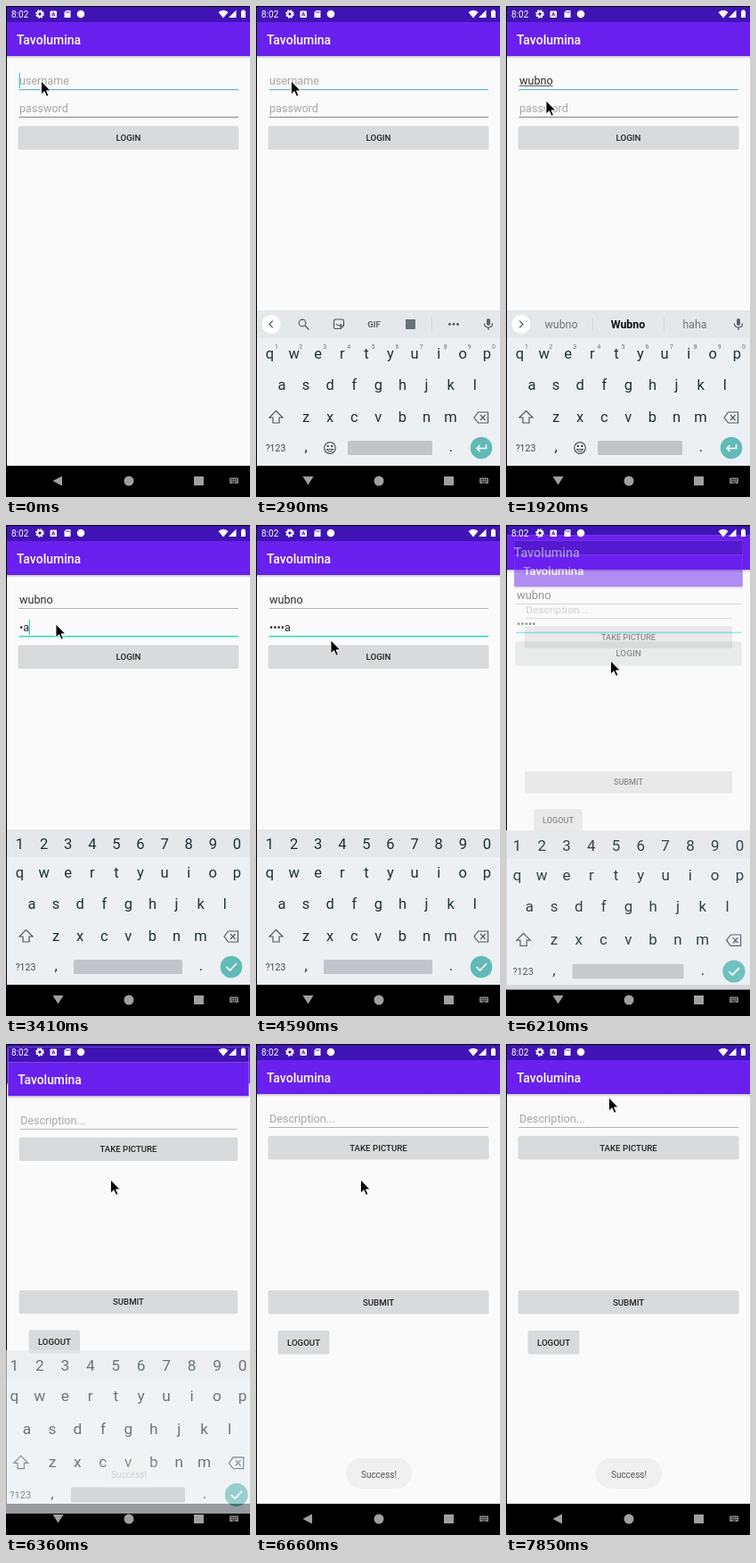
These frames come from a looping animation (274 px wide and 550 px high, 7.99 s). An HTML page:

```html
<!DOCTYPE html>
<html lang="en">
<head>
<meta charset="utf-8">
<title>Login demo</title>
<style>
  html, body { margin: 0; width: 100%; height: 100%; overflow: hidden; background: #000; }
  svg { display: block; width: 274px; height: 550px; font-family: Roboto, "Noto Sans", sans-serif; }
  text { white-space: pre; }
  .title { font-size: 14px; font-weight: 500; fill: #fff; }
  .field { font-size: 12.6px; fill: #2b2b2b; }
  .hint { font-size: 12.6px; fill: #a6a6a6; }
  .btn { font-size: 9.7px; font-weight: 500; fill: #222; text-anchor: middle; }
  .key { font-size: 16.5px; fill: #1c3038; text-anchor: middle; }
  .small { font-size: 10.5px; fill: #3b4a51; text-anchor: middle; }
  .sup { font-size: 7px; fill: #66737a; text-anchor: middle; }
  .word { font-size: 12.4px; fill: #707478; text-anchor: middle; }
  .line { fill: none; stroke: #4b585e; stroke-width: 1.2; }
</style>
</head>
<body>
<svg viewBox="0 0 274 550">
  <defs>
    <clipPath id="screen"><rect x="1" y="1" width="273" height="514"/></clipPath>
    <clipPath id="loginBox"><rect x="14" y="134.500" width="247" height="25.500" rx="1.500"/></clipPath>
    <linearGradient id="fall" x2="0" y2="1">
      <stop stop-color="#000" stop-opacity=".22"/><stop offset="1" stop-color="#000" stop-opacity="0"/>
    </linearGradient>
  </defs>
  <rect width="274" height="550"/>

  <g id="nav" fill="#a0a0a0">
    <path id="back" d="M52.500 532L63 526.500V537.500Z"/>
    <path id="down" d="M52.500 527H64.500L58.500 536.500Z"/>
    <circle cx="138" cy="532" r="5.500"/>
    <rect x="211" y="527" width="11" height="10"/>
    <rect x="251" y="528.500" width="10" height="6.500" rx="1" fill="#858585"/>
    <path d="M252.500 530.500H260M252.500 532.300H260" stroke="#000" stroke-dasharray="1 .8"/>
    <path d="M254 534H258" stroke="#000" stroke-width=".8"/>
  </g>

  <g clip-path="url(#screen)">
    <g id="login"></g>
    <g id="post"></g>
  </g>
  <g id="status" fill="#fff">
    <text x="6" y="13" font-size="10">8:02</text>
    <circle cx="38" cy="9" r="2.700" fill="none" stroke="#fff" stroke-width="2"/>
    <circle cx="38" cy="9" r="4" fill="none" stroke="#fff" stroke-width="1.600" stroke-dasharray="1.800 1.340"/>
    <rect x="49.500" y="5.500" width="7.500" height="7.500" rx="1"/>
    <path d="M51.500 11.500L53.250 7L55 11.500M52.200 10H54.300" stroke="#4013b4" stroke-width=".9" fill="none"/>
    <path d="M67.500 5H72.500V13H65.500V7Z"/>
    <path d="M67.700 6V8M69.300 6V8M70.900 6V8" stroke="#4013b4" stroke-width=".7"/>
    <circle cx="84" cy="9" r="4.300"/>
    <path d="M238.500 7Q244 2.500 249.500 7L244 13.500Z"/>
    <path d="M258.500 4.500V13H250Z"/>
    <path d="M265.200 4.500H267.800V5.500H269V13H264V5.500H265.200Z"/>
  </g>

  <g id="kbClip">
    <g id="kb">
      <rect x="1" y="341" width="273" height="174" fill="#ecf0f3"/>
      <rect x="1" y="341" width="273" height="31" fill="#e5e8eb"/>
      <g id="keys"></g>
      <path class="line" d="M22.500 453.500L30 461H26V467H19V461H15Z"/>
      <path class="line" d="M245 461L249.500 455H260.500V467H249.500ZM252 458L257.500 464M257.500 458L252 464"/>
      <text class="small" x="22" y="499">?123</text>
      <text class="key" x="56" y="499">,</text>
      <text class="key" x="219" y="499">.</text>
      <rect id="space" y="487" height="16" rx="1.500" fill="#c1c5c9"/>
      <circle cx="253" cy="495" r="12.300" fill="#62bab7"/>
      <g id="textExtras">
        <circle class="line" cx="83" cy="495" r="6.300"/>
        <path class="line" d="M79.500 496.500Q83 501.500 86.500 496.500Z"/>
        <circle cx="80.800" cy="493" r="1"/><circle cx="85.200" cy="493" r="1"/>
        <path d="M258.500 491V495.500H248M251.500 492L248 495.500L251.500 499" fill="none" stroke="#fff" stroke-width="1.500"/>
        <circle cx="17" cy="356.500" r="10.500" fill="#fff"/>
        <path id="chevron" class="line" d="M18.800 352.700L15 356.500L18.800 360.300"/>
        <rect x="259" y="350" width="4" height="8" rx="2" fill="#5a6468"/>
        <path class="line" d="M256.500 355.500Q256.500 360 261 360T265.500 355.500M261 360V363"/>
        <g id="tools">
          <circle class="line" cx="52" cy="355" r="3.800"/><path class="line" d="M55 358L59.500 362.500"/>
          <path class="line" d="M89 351H97Q98.500 351 98.500 352.500V358L95 361.500H89Q87.500 361.500 87.500 360V352.500Q87.500 351 89 351ZM98.500 358H95V361.500M90 356Q93 360 96 356"/>
          <text x="132.500" y="360" font-size="9.500" font-weight="700" fill="#5a6468" text-anchor="middle">GIF</text>
          <rect x="168" y="351" width="11" height="11" fill="#687277"/>
          <path d="M197.500 349V364" stroke="#d3d7da"/>
          <g fill="#4b585e"><circle cx="217.500" cy="356.500" r="1.400"/><circle cx="222" cy="356.500" r="1.400"/><circle cx="226.500" cy="356.500" r="1.400"/></g>
        </g>
        <g id="words">
          <path d="M97.500 349V364M177.500 349V364" stroke="#d3d7da"/>
          <text id="wordA" class="word" x="62" y="361"></text>
          <text id="wordB" class="word" x="137" y="361" style="font-weight:700;fill:#111"></text>
          <text class="word" x="212" y="361">haha</text>
        </g>
      </g>
      <path id="check" d="M247.500 495L251.500 499L259 491" fill="none" stroke="#fff" stroke-width="1.600"/>
    </g>
  </g>

  <g id="toast">
    <rect x="101" y="464" width="74" height="34" rx="17" fill="#f0f0f0"/>
    <text x="138" y="485.500" font-size="10" fill="#555" text-anchor="middle">Success!</text>
  </g>
  <path id="mouse" d="M0 0V15L3.600 11.700L6 17.300L8.400 16.300L6 10.900H10.700Z" stroke="#fff" stroke-width=".9"/>
</svg>

<script>
const LOOP = 7990, USER = "wubno", APP = "Tavolumina";
const $ = id => document.getElementById(id);

const page = body => `
  <rect x="1" y="1" width="273" height="514" fill="#fafafa"/>
  <rect x="1" y="56" width="273" height="3" fill="url(#fall)"/>
  <rect x="1" y="18" width="273" height="38" fill="#6a20ee"/>
  <rect x="1" y="1" width="273" height="17" fill="#4013b4"/>
  <text class="title" x="12" y="42.500">${APP}</text>${body}`;

const button = (x, y, w, label) => `
  <rect x="${x - .5}" y="${y + .5}" width="${w + 1}" height="26" rx="2" fill="#000" opacity=".12"/>
  <rect x="${x}" y="${y}" width="${w}" height="25.500" rx="1.500" fill="#d9dadb"/>
  <text class="btn" x="${x + w / 2}" y="${y + 16.500}">${label}</text>`;

const rule = (id, y) => `<rect id="${id}" x="14.500" y="${y}" width="246.500" height="1" fill="#b4b4b4"/>`;

$("login").innerHTML = page(`
  <text id="user" x="15" y="88"></text>${rule("userRule", 93)}
  <rect id="compose" x="15" y="89" height=".8" fill="#333"/>
  <text id="pass" x="15" y="119"></text>${rule("passRule", 124)}
  <rect id="caret" width="1.200" height="17" fill="#27cdb8"/>
  ${button(14, 134.5, 247, "LOGIN")}
  <g clip-path="url(#loginBox)"><circle id="ripple" cx="122.500" cy="147" fill="#000" opacity=".075"/></g>`);

$("post").innerHTML = page(`
  <text class="hint" x="15" y="88">Description...</text>${rule("", 93)}
  ${button(14, 103, 247, "TAKE PICTURE")}
  ${button(14, 276, 247, "SUBMIT")}
  ${button(25, 321, 57, "LOGOUT")}`);

const row = (chars, x, y, cls) => [...chars].map((c, i) =>
  `<text class="${cls}" x="${x + 27.1 * i}" y="${y}">${c}</text>`).join("");
$("keys").innerHTML =
  row("qwertyuiop", 15.5, 395, "key") + row("asdfghjkl", 29, 430, "key") + row("zxcvbnm", 56, 465.5, "key") +
  `<g id="sups">${row("1234567890", 23, 384, "sup")}</g><g id="digits">${row("1234567890", 15.5, 363, "key")}</g>`;

// Latest value whose start time has passed
const at = (steps, t) => steps.reduce((v, [start, value]) => t >= start ? value : v, steps[0][1]);
const show = (id, on) => { $(id).style.display = on ? "" : "none"; };
const set = (id, attrs) => { for (const k in attrs) $(id).setAttribute(k, attrs[k]); };
const zoom = (s, cy) => `translate(137.500 ${cy}) scale(${s}) translate(-137.500 ${-cy})`;

const mouse = [[0, [39.5, 84]], [1780, [41, 94]], [1920, [45, 106]], [2070, [52, 110]], [2220, [56, 111]],
  [4440, [64, 116]], [4590, [84, 129]], [4740, [104, 144]], [4880, [114, 150]], [5030, [117.5, 152]],
  [7250, [118, 143]], [7400, [119, 118]], [7550, [118, 91]], [7700, [116, 69]], [7850, [115.5, 60]]];
const typed = [[0, 0], [890, 1], [1040, 2], [1190, 3], [1330, 4], [1480, 5]];
const secret = [[0, ""], [3410, "•a"], [3710, "••a"], [3850, "•••a"], [4000, "••••a"], [5480, "•••••"]];
const caretOn = [[0, 1], [290, 0], [890, 1], [1780, 0], [2220, 1], [2960, 0], [3410, 1], [4440, 0],
  [4880, 1], [5620, 0]];
const slide = [[0, 174], [150, 60], [290, 0]];
const rippleR = [[0, 0], [5330, 86], [5480, 180], [5620, 0]];
const oldZoom = [[0, 1], [6210, 1.025], [6360, 1.05]];
const newZoom = [[0, .94], [6360, .99], [6510, .997], [6660, 1]];
const newAlpha = [[0, 0], [6210, .5], [6360, 1]];
const kbAlpha = [[0, 1], [6210, .9], [6360, .65], [6510, .2], [6660, 0]];
const toastAlpha = [[0, 0], [6360, .2], [6510, .7], [6660, 1]];

function label(id, value, hint) {
  $(id).textContent = value || hint;
  set(id, { class: value ? "field" : "hint" });
}

function render(t) {
  const name = USER.slice(0, at(typed, t)), pw = at(secret, t);
  const onPass = t >= 2220, numeric = t >= 2370, leaving = t >= 6210;

  label("user", name, "username");
  label("pass", pw, "password");
  const nameW = name ? $("user").getComputedTextLength() : 0;
  const passW = pw ? $("pass").getComputedTextLength() : 0;
  show("compose", name && !onPass);
  set("compose", { width: nameW });
  set("caret", { x: 14.6 + (onPass ? passW : nameW), y: onPass ? 106 : 75, opacity: at(caretOn, t) });
  set("userRule", { fill: onPass ? "#b4b4b4" : "#6bbcc2", height: onPass ? 1 : 1.3 });
  set("passRule", { fill: onPass ? "#35d9c3" : "#858585", height: onPass ? 1.5 : 1 });
  set("ripple", { r: at(rippleR, t) });

  show("words", name);
  show("tools", !name);
  $("wordA").textContent = name;
  $("wordB").textContent = name.charAt(0).toUpperCase() + name.slice(1);
  set("chevron", { transform: name ? "translate(34 0) scale(-1 1)" : "" });
  show("textExtras", !numeric);
  show("sups", !numeric);
  show("digits", numeric);
  show("check", numeric);
  set("space", { x: numeric ? 76 : 103, width: numeric ? 122 : 95 });

  const big = at(oldZoom, t);
  set("login", { transform: zoom(big, 293) });
  set("post", { transform: zoom(at(newZoom, t), 275), opacity: at(newAlpha, t) });
  set("kb", { transform: leaving ? zoom(big, 295) : `translate(0 ${at(slide, t)})`, opacity: at(kbAlpha, t) });
  set("kbClip", { "clip-path": leaving ? "none" : "url(#screen)" });
  show("kbClip", t >= 150 && t < 6660);
  const open = t >= 150 && t < 6510;
  show("down", open);
  show("back", !open);
  set("toast", { opacity: at(toastAlpha, t) });
  set("mouse", { transform: `translate(${at(mouse, t)})` });
}

const begin = performance.now();
function tick() {
  render((performance.now() - begin) % LOOP);
  requestAnimationFrame(tick);
}
tick();
</script>
</body>
</html>
```
